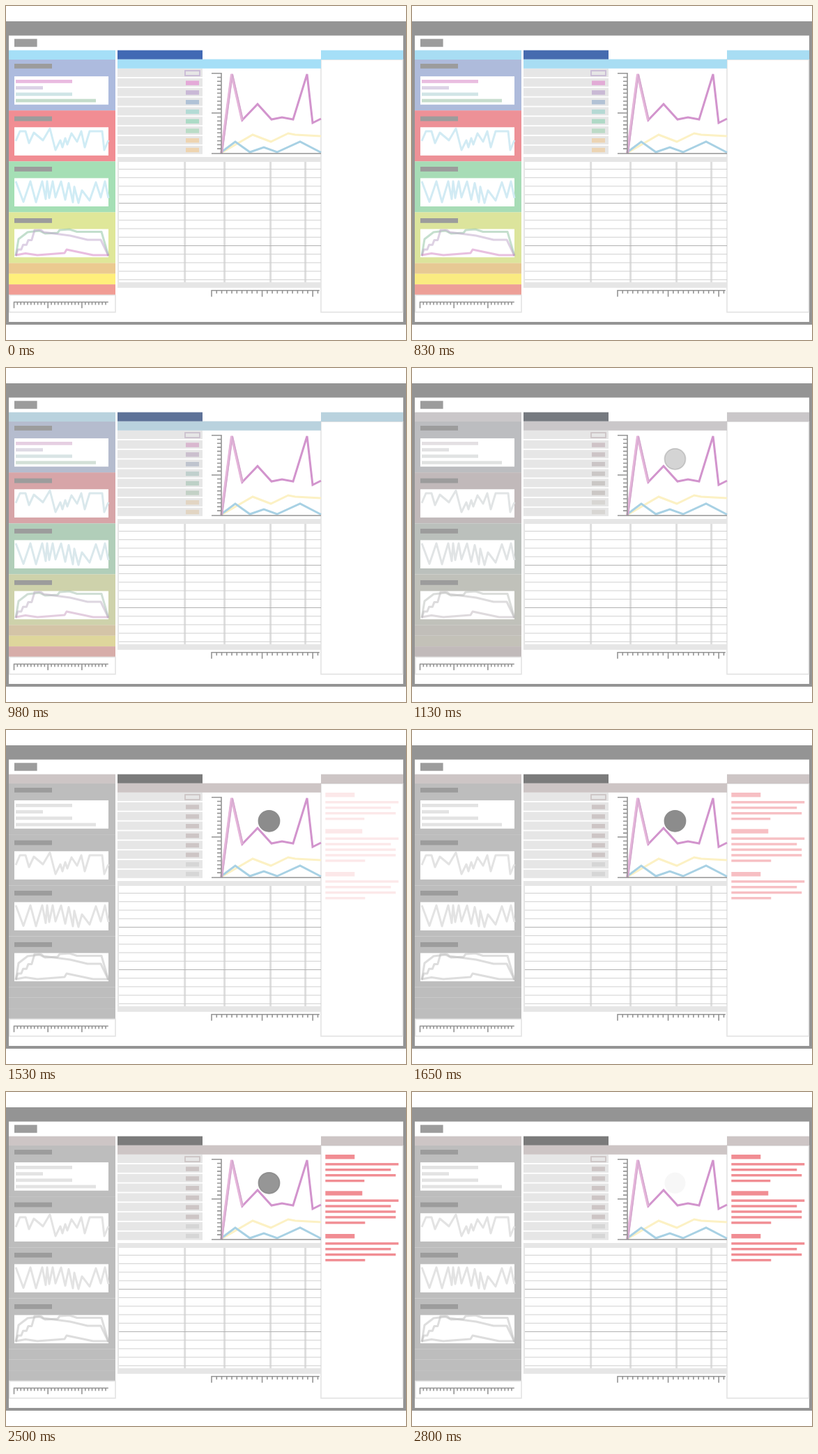
Recreate the animation shown at these times as an HTML page. Size 574 by 480 pixels, loop 5.86 s.

```html
<!DOCTYPE html>
<html lang="en">
<head>
<meta charset="utf-8">
<title>Dashboard losing its colour</title>
<style>
  html, body { margin: 0; width: 100%; height: 100%; overflow: hidden; background: #fff; }
  svg { display: block; width: 574px; height: 480px; }
  .tone, .dot, .notes { animation: 5860ms linear infinite; }
  .tone { animation-name: tone; }
  .dot { animation-name: dot; }
  .notes { animation-name: notes; }

  /* colours drain 830–1190 ms */
  @keyframes tone {
    0% { color: var(--a); }
    14.1638% { color: var(--a); animation-timing-function: steps(12, start); }
    20.3072%, 100% { color: var(--b); }
  }
  /* dot appears 1070–1370 ms, fades 2500–2830 ms */
  @keyframes dot {
    0%, 18.2593% { fill-opacity: 0; stroke-opacity: 0; }
    18.2594% { fill-opacity: .111; stroke-opacity: .111; animation-timing-function: steps(10, start); }
    23.3788% { fill-opacity: 1; stroke-opacity: 1; }
    42.6621% { fill-opacity: 1; stroke-opacity: 1; animation-timing-function: steps(11, start); }
    48.2935%, 100% { fill-opacity: .07; stroke-opacity: 0; }
  }
  /* notes appear 1530–1830 ms */
  @keyframes notes {
    0%, 26.1091% { opacity: 0; }
    26.1092% { opacity: .111; animation-timing-function: steps(10, start); }
    31.2286%, 100% { opacity: 1; }
  }
</style>
</head>
<body>
<svg id="stage" viewBox="0 0 574 480"></svg>
<script>
const GREY = '#949494', PALE = '#e6e6e6', EDGE = '#e3e3e3', LABEL = '#9c9c9c',
  DULL = '#cdc5c5', PANEL = '#bdbdbd', RED = '#f18d93';
const out = [];
const add = markup => out.push(markup);
const repeat = (count, draw) => Array.from({ length: count }, (_, i) => draw(i));

const rect = (x, y, w, h, fill, extra = '') =>
  add(`<rect x="${x}" y="${y}" width="${w}" height="${h}" fill="${fill}" ${extra}/>`);
const outlined = (x, y, w, h) => rect(x, y, w, h, '#fff', `stroke="${EDGE}" stroke-width="1.6"`);
const tone = (from, to) => `class="tone" style="--a:${from};--b:${to}"`;
const toneRect = (x, y, w, h, from, to) => rect(x, y, w, h, 'currentColor', tone(from, to));
const path = (d, color, width, extra = '') =>
  add(`<path d="${d}" fill="none" stroke="${color}" stroke-width="${width}" ${extra}/>`);
const toneLine = (points, from, to, opacity = 1) =>
  path('M' + points, 'currentColor', 3, `stroke-linejoin="round" stroke-opacity="${opacity}" ${tone(from, to)}`);

function ruler(left, width, y, step, short, long) {
  const ticks = repeat(Math.floor(width / step) + 1,
    i => `M${left + i * step} ${y}v${i % 10 ? short : long}`);
  path(`M${left - .7} ${y}h${width}` + ticks.join(''), GREY, 1.6);
}

function frame() {
  rect(0, 22, 574, 436, GREY);
  rect(4, 42.5, 566, 411.5, '#fff');
  rect(12, 47.3, 32.6, 11.4, LABEL);
  outlined(452, 77, 117.4, 363);
  toneRect(4, 63.6, 153, 13.4, '#a5dff7', DULL);
  toneRect(160, 76.5, 292, 13.3, '#a5dff7', DULL);
  toneRect(452, 63.6, 118, 13.4, '#a5dff7', DULL);
  toneRect(160, 63.6, 122, 13, '#4169b4', '#7b7b7b');
}

// Zigzag between two drifting envelopes
function zigzag(turns) {
  const crest = x => 252 + 13 * Math.exp(-(((x - 108) / 14) ** 2));
  const trough = x => 279 + 4 * Math.cos((x - 35) / 11);
  return turns.map((x, i) => [x, (i % 2 ? trough : crest)(x)]).join(' ');
}

// Plateaus climbing to a summit
const staircase = (x, y, run, rise, count) =>
  repeat(count, i => `${x + i * run},${y - i * rise} ${x + i * run + run * .65},${y - i * rise}`).join(' ');

function sidebar() {
  const panels = [['#adbbde', 83], [RED, 158.6], ['#a5dfb5', 231], ['#dfe799', 305]];
  panels.forEach(([color, labelTop], i) => {
    const top = 77 + i * 73.15;
    toneRect(4, top, 153, 73.2, color, PANEL);
    rect(12, labelTop, 54, 6.8, LABEL);
    rect(12, top + 24.1, 135, 40.6, '#fff');
  });
  ['#ebca90', '#ffef7b', '#f19c94'].forEach((color, i) =>
    toneRect(4, 369.5 + i * 15.3, 153, 15.3, color, PANEL));

  [['#e9bae0', 81], ['#dbd2e6', 39], ['#cfe5e6', 81], ['#c3dccb', 115]].forEach(([color, width], i) =>
    toneRect(14, 106 + i * 9.2, width, 4.8, color, EDGE));

  toneLine('14,194 20,180 28,180 33,197 40,182 53,193 63,176 71,207 78,193 81,203 85,190 88,199 ' +
    '94,183 102,195 108,180 113,203 120,180 138,180 141,207 147,193', '#d0ecf5', EDGE);
  toneLine(zigzag([14, 25, 35, 43, 52, 57, 59, 62, 67, 71, 79, 85, 90, 96, 98, 104, 109, 120, 129, 136, 142, 147]),
    '#d0ecf5', EDGE);
  toneLine('14,359 18,335 31,325 48,323 56,327 74,326 77,322 91,321 102,324.5 137,324.5 147,359',
    '#87bf9b', '#bbb', .5);
  toneLine(`14,359 ${staircase(17, 350, 7.5, 6.8, 3)} 41,322 50,322 54,325 92,330 117,336 136,336 147,359`,
    '#bba1c9', '#bbb', .5);
  toneLine('14,358 28,355.5 45,358 84,355 87,350 125,358 147,358', '#d47cc2', '#bbb', .5);

  outlined(4.8, 415.5, 152.2, 24.5);
  ruler(11.5, 136, 425.5, 4.87, 4, 8.7);
}

function legend() {
  repeat(9, i => rect(160, 90 + i * 13.85, 122, 12, PALE));
  rect(257, 93, 21, 7, 'none', `stroke="currentColor" stroke-width="1.8" ${tone('#c9bad6', DULL)}`);
  ['#e4a9d8', '#c9b8d6', '#b0c2d6', '#b3dbd5', '#acdbc6', '#b9dcc6', '#eed4b0', '#eed4b0'].forEach((color, i) =>
    toneRect(258, 107.4 + i * 13.77, 19, 6.4, color, i < 6 ? DULL : '#d6d6d6'));
}

function chart() {
  const pinkRise = 'M309 212L324 98L339 164';
  path('M309 211L354 185L380 195L405 183L415 185L452 187', '#fcf1c4', 3);
  path('M309 210L329 195L350 210L370 203L389 210L422 195L452 210.5', '#a8d1e4', 3);
  path(pinkRise + 'L361 141L381 163L396 160L412 163L432 98L440 168L452 162', '#d294cd', 3);
  path(pinkRise, '#e5b5da', 4);
  path(pinkRise, '#cda3ca', 1, 'transform="translate(1.3)"');
  const ticks = repeat(20, i => `M309 ${96.8 + i * 5.7}H${i % 10 ? 303 : 295}`);
  path('M309 96V212M295 212H452' + ticks.join(''), GREY, 1.6);
  add('<circle class="dot" cx="377.5" cy="130.8" r="15" fill="#8c8c8c" stroke="#8c8c8c" stroke-width="1.8"/>');
}

function table() {
  rect(160, 217, 292, 7, PALE);
  rect(160, 397, 292, 8, PALE);
  path('M161 217V405', PALE, 2);
  [256.7, 313.6, 379.6, 429.6].forEach(x => path(`M${x} 224V397`, '#dedede', 3));
  repeat(14, i => path(`M162 ${234.5 + i * 12.22}H452`, i % 5 === 4 ? '#b0b0b0' : '#d0d0d0', 1));
  ruler(295, 155.5, 408.7, 7.26, 4.5, 9);
}

function note(top, titleWidth, rowWidths) {
  rect(458.3, top, titleWidth, 6.4, RED);
  rowWidths.forEach((width, i) => rect(458.3, top + 12.1 + i * 7.95, width, 3.4, RED));
}

function notes() {
  add('<g class="notes">');
  note(90, 42, [105, 94, 101, 56]);
  note(142.3, 53, [105, 94, 101, 101, 57]);
  note(204, 42, [105, 94, 101, 57]);
  add('</g>');
}

[frame, sidebar, legend, chart, table, notes].forEach(draw => draw());
document.getElementById('stage').innerHTML = out.join('');
</script>
</body>
</html>
```
